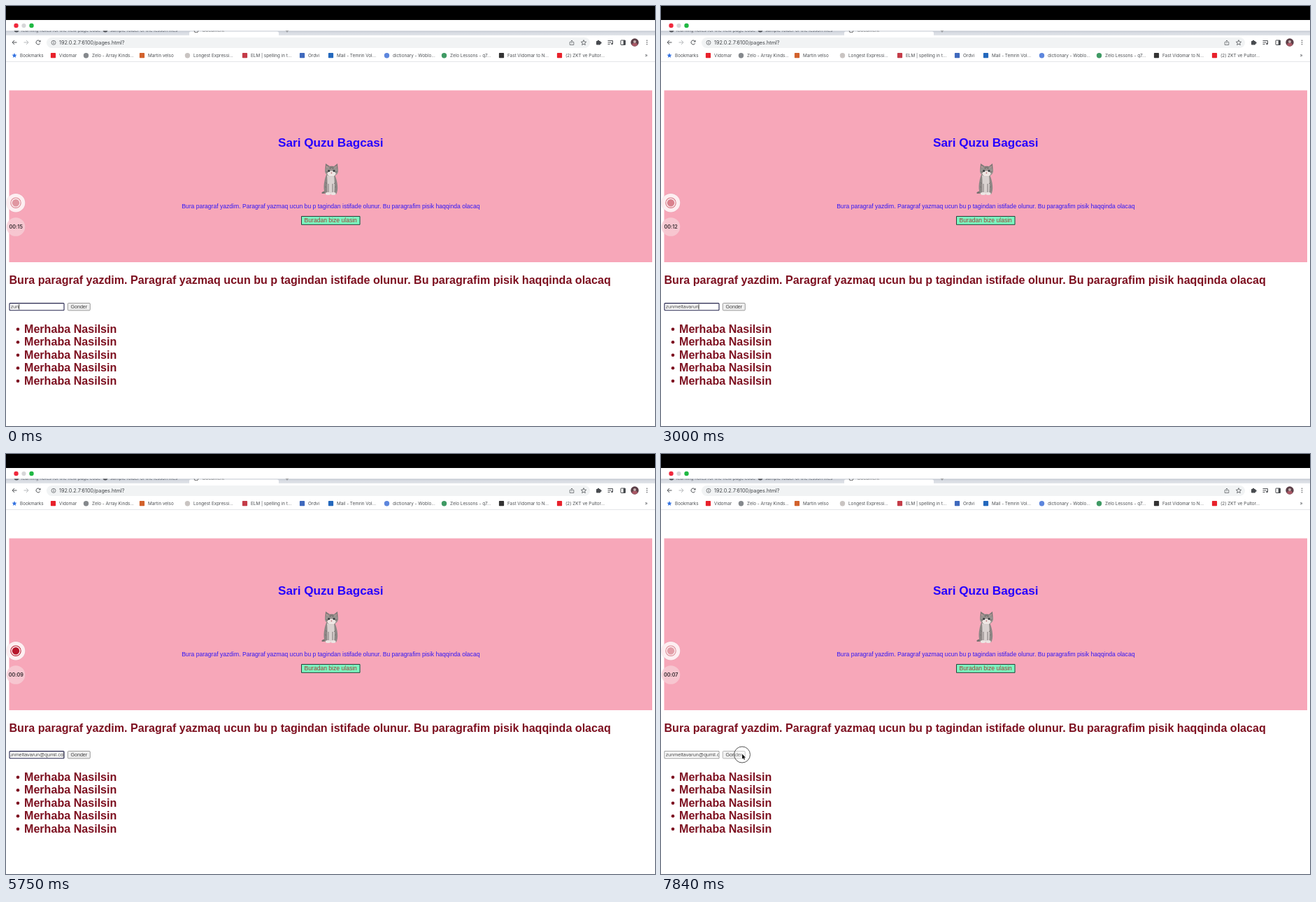
Recreate the animation shown at these times as an HTML page with a canvas. Size 928 by 600 pixels, loop 8 s.

```html
<!DOCTYPE html>
<html lang="az">
<head>
<meta charset="utf-8">
<title>Screen recording</title>
<style>
html, body { margin: 0; width: 100%; height: 100%; overflow: hidden; background: #fff; }
canvas { display: block; }
</style>
</head>
<body>
<canvas id="stage" width="928" height="600"></canvas>
<script>
const ctx = document.getElementById('stage').getContext('2d');
const LOOP = 8000;
const SANS = '"Liberation Sans", Arial, sans-serif';
const UI = 'Inter, Roboto, sans-serif';
const MAROON = '#7d1020';
const LINE = 'Bura paragraf yazdim. Paragraf yazmaq ucun bu p tagindan istifade olunur. Bu paragrafim pisik haqqinda olacaq';

const ENTRY = 'zunmeltavarun@qumil.com';
const START = 3;
const KEYS = [330, 500, 670, 1170, 1340, 1500, 1670, 1840, 2090, 2340,
  3920, 4170, 4340, 4500, 4670, 4840, 5170, 5420, 5670, 5920];
const CLICK = 7750;

// [time, opacity] of the record light, flat while the picture rests
const PULSE = [[0, .25], [170, .25], [840, .88], [1170, .88], [1500, 1], [2090, 1], [2340, .95],
  [3000, .3], [3750, .3], [4250, .6], [4670, .9], [4840, .9], [5750, 1], [5920, 1],
  [6590, .6], [6920, .4], [7000, .35], [7750, .3], [7840, .2]];
const POINTER = [[6250, 97, 449], [6590, 105.5, 442.5], [6920, 116, 428.5]];

const BOOKMARKS = [
  [20, 'Bookmarks', 'star', '#2f6fe0'],
  [76, 'Vidomar', 'box', '#e8212b'],
  [123, 'Zelo - Array Kinds...', 'dot', '#85898d'],
  [203, 'Martin velso', 'box', '#d2622c'],
  [268, 'Longest Expressi...', 'dot', '#c9c4c2'],
  [350, 'ELM | spelling in t...', 'box', '#c43c48'],
  [432, 'Ordvi', 'box', '#3f69bd'],
  [473, 'Mail - Temrin Vol...', 'box', '#2368bd'],
  [553, 'dictionary - Woblo...', 'dot', '#5d86dd'],
  [635, 'Zelo Lessons - q7...', 'dot', '#3f9a64'],
  [717, 'Fast Vidomar to N...', 'box', '#333'],
  [800, '(2) ZKT ve Pultor...', 'box', '#e8212b']
];

function rect(x, y, w, h, fill, r = 0) {
  ctx.fillStyle = fill;
  ctx.beginPath();
  ctx.roundRect(x, y, w, h, r);
  ctx.fill();
}

function frame(x, y, w, h, color, r = 0, width = 1) {
  ctx.strokeStyle = color;
  ctx.lineWidth = width;
  ctx.beginPath();
  ctx.roundRect(x, y, w, h, r);
  ctx.stroke();
}

function oval(x, y, rx, ry, fill, turn = 0) {
  ctx.fillStyle = fill;
  ctx.beginPath();
  ctx.ellipse(x, y, rx, ry, turn, 0, Math.PI * 2);
  ctx.fill();
}

const disc = (x, y, r, fill) => oval(x, y, r, r, fill);

function ring(x, y, r, color, width = 1, from = 0, to = Math.PI * 2) {
  ctx.strokeStyle = color;
  ctx.lineWidth = width;
  ctx.beginPath();
  ctx.arc(x, y, r, from, to);
  ctx.stroke();
}

function path(d, x, y, { fill, stroke, width = 1 }) {
  ctx.save();
  ctx.translate(x, y);
  const p = new Path2D(d);
  if (stroke) {
    ctx.strokeStyle = stroke;
    ctx.lineWidth = width;
    ctx.stroke(p);
  }
  if (fill) {
    ctx.fillStyle = fill;
    ctx.fill(p);
  }
  ctx.restore();
}

function text(str, x, y, size, color, { font = SANS, weight = 400, align = 'left' } = {}) {
  ctx.font = `${weight} ${size}px ${font}`;
  ctx.fillStyle = color;
  ctx.textAlign = align;
  ctx.fillText(str, x, y);
}

function clipped(x, y, w, h, draw) {
  ctx.save();
  ctx.beginPath();
  ctx.rect(x, y, w, h);
  ctx.clip();
  draw();
  ctx.restore();
}

// Linear interpolation between rows of [time, ...values]
function track(rows, t) {
  if (t <= rows[0][0]) return rows[0].slice(1);
  const i = rows.findIndex(row => row[0] > t);
  if (i < 0) return rows[rows.length - 1].slice(1);
  const [a, b] = [rows[i - 1], rows[i]];
  const k = (t - a[0]) / (b[0] - a[0]);
  return a.slice(1).map((v, n) => v + (b[n + 1] - v) * k);
}

function star(x, y, r, paint) {
  let d = '';
  for (let i = 0; i < 10; i++) {
    const a = i * Math.PI / 5 - Math.PI / 2;
    const q = i % 2 ? r * .45 : r;
    d += `${i ? 'L' : 'M'}${q * Math.cos(a)} ${q * Math.sin(a)}`;
  }
  path(d + 'Z', x, y, paint);
}

function drawTabs() {
  rect(0, 0, 928, 20, '#000');
  disc(14.5, 28, 3.2, '#f0283c');
  disc(25.5, 28, 3.1, '#d6d6d8');
  disc(36.5, 28, 3.2, '#20b843');
  const shade = ctx.createLinearGradient(0, 35, 0, 42);
  shade.addColorStop(0, '#b4bac6');
  shade.addColorStop(.35, '#d5d9e0');
  shade.addColorStop(1, '#e2e5ea');
  rect(0, 35.5, 928, 6.5, shade);
  rect(262, 36.5, 128, 6, '#fff', [2, 2, 0, 0]);
  clipped(0, 35.5, 928, 3, () => {
    const opt = { font: UI };
    disc(15, 34, 3.5, '#44474d');
    text('learning notes for the new page code', 22, 37, 6.4, '#555a62', opt);
    disc(142, 34, 3.5, '#44474d');
    text('sample folder of the lesson files', 149, 37, 6.4, '#555a62', opt);
    ring(272, 35, 3, '#666', 1);
    text('Document', 281, 37, 6.4, '#777', opt);
    text('+', 399, 38, 9, '#555', opt);
  });
}

function drawToolbar() {
  const dark = { stroke: '#505357', width: 1 };
  path('M3.5 0H-3M0 -3L-3 0L0 3', 12, 52, dark);
  path('M-3.5 0H3M0 -3L3 0L0 3', 29, 52, { stroke: '#b6b8bb' });
  ring(46, 52, 3, '#505357', 1, .5, 5.5);
  path('M3.5 -3.5V-.5H.5Z', 46, 52, { fill: '#505357' });
  rect(58, 45, 777, 15, '#f1f3f4', 7.5);
  ring(68, 52.3, 3, '#606468', .8);
  rect(67.6, 51.8, .9, 2.3, '#606468');
  rect(67.6, 50.3, .9, .9, '#606468');
  text('192.0.2.7:6100/pages.html?', 76, 55, 7.25, '#3f4246', { font: UI });

  path('M-1.5 -1H-2.8V3H2.8V-1H1.5M0 1V-3.5M-1.5 -2L0 -3.5L1.5 -2', 809, 52.5, { stroke: '#606468', width: .8 });
  star(826, 52.5, 3.9, { stroke: '#505357', width: .8 });
  rect(844, 50, 6, 5.5, '#484b4f', .8);
  disc(847, 50, 1.3, '#484b4f');
  disc(850.3, 52.6, 1.3, '#484b4f');
  path('M-4 -2.5H3M-4 0H1M-4 2.5H-1M3 -2.5V2', 864.5, 52, dark);
  disc(866.5, 54, 1.3, '#505357');
  frame(879, 49, 6.5, 6.5, '#484b4f', .5);
  rect(882.7, 49, 3, 6.5, '#484b4f');
  disc(899, 52, 5.7, '#5c3f48');
  oval(899, 55, 3.8, 2.3, '#a95765');
  disc(899, 51, 2, '#c7b1b0');
  for (const y of [49.3, 52, 54.7]) disc(916.5, y, .8, '#505357');
}

function drawBookmarks() {
  for (const [x, label, shape, color] of BOOKMARKS) {
    const cx = x - 8.5;
    if (shape === 'star') star(cx + .5, 70.8, 3.7, { fill: color });
    else if (shape === 'dot') disc(cx, 70.7, 3.7, color);
    else rect(cx - 3.6, 67.1, 7.2, 7.2, color, .8);
    text(label, x, 73, 6.35, '#4d5054', { font: UI });
  }
  text('»', 913.5, 73, 7, '#55585c', { font: UI });
  rect(0, 79, 928, 1, '#e5e6e8');
}

function drawCat() {
  path('M-6 19C-14 22 -14 18 -10 17L-7 15Z', 464, 248, { fill: '#777170' });
  path('M-6 -7C-10 3 -11 16 -7 21H8C12 15 10 2 6 -7Z', 464, 248, { fill: '#8d8785' });
  path('M-5 -6C-4 4 -5 15 -4 21H5C6 13 6 2 5 -6Z', 464, 248, { fill: '#d9d2d0' });
  path('M-3 6V20M3 6V20M-7 4L-5 6M7 4L5 6M-8 10L-6 11M8 10L6 11', 464, 248, { stroke: '#777170', width: .9 });
  path('M-9 1L-8 -11L-2 -7H4L9 -11L10 1Z', 465, 236, { fill: '#7f7977' });
  path('M-7 -4L-6.7 -8L-3.8 -5ZM7.4 -4L7.6 -8L4.8 -5Z', 465, 236, { fill: '#d9a6a8' });
  oval(465.5, 236, 9.5, 7.6, '#99928f');
  oval(465.5, 239.5, 6, 4, '#eee6e3');
  path('M-2 -7V-3M0 -7V-4M2 -7V-3M-8 1H-5M5 1H8', 465.5, 236, { stroke: '#5f5a59', width: .8 });
  disc(461.7, 235.5, 1.5, '#34393c');
  disc(469, 235.5, 1.5, '#34393c');
  disc(465.4, 238.5, .9, '#b87478');
  oval(460.5, 268, 3.7, 2, '#ece5e3');
  oval(468, 268, 3.7, 2, '#ece5e3');
}

function drawPage() {
  rect(4.5, 120.5, 919.5, 245.5, '#f7a7b9');
  text('Sari Quzu Bagcasi', 464.3, 201, 17.16, '#2600ff', { weight: 700, align: 'center' });
  drawCat();
  text(LINE, 464.3, 289, 8.58, '#3318f5', { align: 'center' });
  rect(422, 300, 84.5, 12.7, '#7bf8c1');
  frame(422.5, 300.5, 83.5, 11.8, '#2b3b36');
  text('Buradan bize ulasin', 464.2, 309.4, 8.58, '#a13a37', { align: 'center' });

  text(LINE, 4.5, 397.4, 16.1, MAROON, { weight: 700 });
  for (let i = 0; i < 5; i++) {
    const y = 466.6 + i * 18.5;
    disc(17, y - 4.8, 2.3, MAROON);
    text('Merhaba Nasilsin', 26, y, 16.1, MAROON, { weight: 700 });
  }
}

function drawForm(t) {
  const focus = t < CLICK;
  const typed = ENTRY.slice(0, START + KEYS.filter(k => k <= t).length);
  rect(4.5, 424.5, 79, 10.5, '#fff');
  frame(5, 424.6, 78, 10.2, focus ? '#25254d' : '#858585', focus ? 1 : 0, focus ? 1.1 : .8);
  clipped(6, 425, 76.5, 9.5, () => {
    ctx.font = `400 7.15px ${SANS}`;
    const w = ctx.measureText(typed).width;
    const x = focus ? Math.min(6.8, 81.8 - w) : 6.8;
    text(typed, x, 431.9, 7.15, '#444');
    if (t < 6170) rect(x + w, 426, .8, 7.4, '#111');
  });
  rect(88, 424.3, 32.5, 10.8, focus ? '#efefef' : '#f3f3f3', 1.3);
  frame(88.3, 424.5, 32, 10.4, focus ? '#858585' : '#a5a5a5', 1.3, .8);
  text('Gonder', 104.3, 432, 7.15, '#444', { align: 'center' });
}

function drawRecorder(t) {
  const [glow] = track(PULSE, Math.floor(t / 83.4) * 83.4);
  disc(14, 281.2, 13.8, 'rgba(150,110,120,.12)');
  disc(14, 281.2, 13.3, '#fdeef1');
  ctx.globalAlpha = .35 + .65 * glow;
  ring(14, 281.2, 7.2, '#bd2437', 1.1);
  ctx.globalAlpha = .2 + .8 * glow;
  disc(14, 281.2, 5.2, '#b5142a');
  ctx.globalAlpha = 1;
  disc(14, 315.5, 13.3, 'rgba(246,205,214,.82)');
  const left = 15 - Math.floor((t + 250) / 1000);
  text('00:' + String(left).padStart(2, '0'), 14.2, 318.1, 7.2, '#332a2e', { font: UI, weight: 600, align: 'center' });
}

function drawPointer(t) {
  if (t < POINTER[0][0]) return;
  const [x, y] = track(POINTER, t);
  if (t >= CLICK) {
    const r = Math.min(11.5, 8 + (t - CLICK) / 25);
    disc(116, 429.5, r, 'rgba(255,255,255,.3)');
    ring(116, 429.5, r, '#555', 1);
  }
  path('M0 0V7.2L1.7 5.7L2.8 8.3L4 7.8L2.9 5.2H5Z', x, y, { fill: '#111', stroke: '#fff', width: 1.2 });
}

function draw(now) {
  const t = now % LOOP;
  rect(0, 0, 928, 600, '#fff');
  drawTabs();
  drawToolbar();
  drawBookmarks();
  drawPage();
  drawForm(t);
  drawRecorder(t);
  drawPointer(t);
}

const begin = performance.now();
function tick() {
  draw(performance.now() - begin);
  requestAnimationFrame(tick);
}
tick();
</script>
</body>
</html>
```
